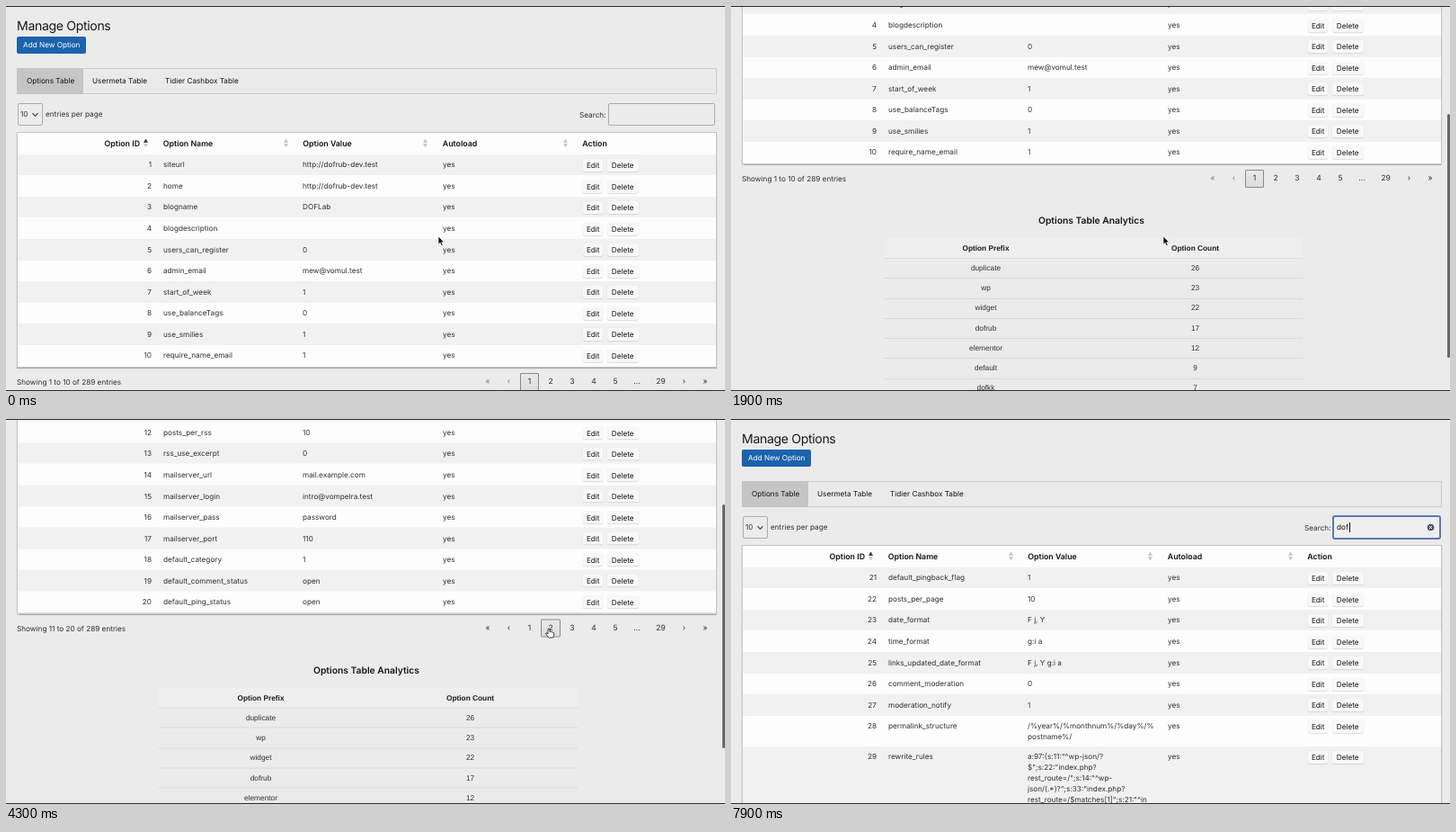
Write an HTML page that moves like this. It is 800 px wide and 428 px high and loops after 8000 ms.

```html
<!DOCTYPE html>
<html lang="en">
<head>
<meta charset="utf-8">
<title>Manage Options</title>
<style>
  html, body { margin: 0; width: 100%; height: 100%; overflow: hidden; background: #ebebeb; }
  #stage { position: relative; width: 800px; height: 428px; overflow: hidden; background: #ebebeb;
    font: 8.2px/11.8px Inter, sans-serif; color: #303030; text-rendering: geometricPrecision; }
  #stage div, #stage svg { position: absolute; box-sizing: border-box; }
  #page { left: 0; top: 0; width: 800px; height: 780px; }
  .t { white-space: pre; width: 300px; }
  .c { text-align: center; }
  .r { text-align: right; }
  .dark { color: #161616; }
  .h1 { font-size: 14.1px; letter-spacing: -.35px; color: #1a1a1a; }
  .h2 { font-size: 10.3px; font-weight: 600; color: #161616; }
  .th { font-size: 8.8px; font-weight: 600; color: #111; }
  .white { color: #fff; }
  .arial { font-family: "Liberation Sans", Arial, sans-serif; font-size: 8.3px; }
  .b { font-weight: 700; color: #1c1c1c; }
  .pg { font-size: 8.6px; }
  .i { font-style: italic; }
  .i u { color: #1c62ac; }
  .add { background: #1c63ad; border-radius: 2px; }
  .tabs { border: 1px solid #cbcbcb; background: #eaeaea; }
  .tab { background: #c5c5c5; }
  .field { border: 1px solid #acacac; border-radius: 2px; background: #ececec; }
  .focus { border-color: #5b79ae; box-shadow: 0 0 0 1px #5b79ae; background: #eee; }
  #grid { border: 1px solid #c4c4c4; background: #fdfdfd; box-shadow: 0 1px 1px #aaa; }
  .odd { background: #f1f1f1; }
  .btn { background: #f8f8f8; border-radius: 2px; box-shadow: 0 .5px 1px #c4c4c4; }
  .up, .down { border: 2.5px solid transparent; width: 5px; height: 4px; }
  .up { border-top: 0; border-bottom: 4px solid #cbcbcb; }
  .down { border-bottom: 0; border-top: 4px solid #cbcbcb; }
  .on { border-bottom-color: #444; }
  .line { background: #dadada; }
  .head { background: #eee; }
  #active { border: 1px solid #8b8b8b; border-radius: 1px; background: linear-gradient(#e9e9e9, #dcdcdc); }
  #thumb { background: #666; border-radius: 2px; }
  .edge { background: #2b2b2b; left: 0; width: 800px; }
  #caret { background: #111; }
</style>
</head>
<body>
<div id="stage">
  <div id="page"></div>
  <div id="thumb" style="left:797px;width:3px"></div>
  <div id="top" class="edge" style="top:0"></div>
  <div id="bottom" class="edge" style="bottom:0"></div>
  <svg id="cursor" width="20" height="20" viewBox="-5 -2 20 20" style="left:-5px;top:-2px">
    <path id="arrow" d="M0 0V9.2L2.1 7.3L3.6 10.6L5.2 9.9L3.8 6.7H6.6Z" fill="#111" stroke="#fff" stroke-width=".7"/>
    <path id="hand" d="M-1 .6Q0-.6 1 .6V3.6Q2 2.8 2.7 3.8Q3.8 3.2 4.3 4.3Q5.6 4 5.6 5.3V7.4Q5.2 8.7 4.7 10H-.4Q-1.3 8.2-3.4 5.9Q-3.5 4.6-2.2 5L-1 6Z" fill="#fff" stroke="#222" stroke-width=".9"/>
    <path id="beam" d="M-2-5Q0-5 0-4Q0-5 2-5M0-4V4M-2 5Q0 5 0 4Q0 5 2 5" transform="translate(0 5)" fill="none" stroke="#222" stroke-width=".9"/>
  </svg>
</div>
<script>
const LOOP = 8000;
const $ = id => document.getElementById(id);
const page = $('page');

function box(parent, x, y, w, h, cls = '') {
  const el = document.createElement('div');
  el.className = cls;
  el.style.cssText = `left:${x}px;top:${y}px;width:${w}px;height:${h}px`;
  parent.append(el);
  return el;
}

// y is the middle of the first line
function text(parent, str, x, y, cls = '') {
  const kind = cls.split(' ');
  const shift = kind.includes('r') ? 300 : kind.includes('c') ? 150 : 0;
  const el = document.createElement('div');
  el.className = 't ' + cls;
  el.style.cssText = `left:${x - shift}px;top:${y - 5.2}px`;
  el.textContent = str;
  parent.append(el);
  return el;
}

function group(parent) { return box(parent, 0, 0, 800, 0); }

// Top of the page
text(page, 'Manage Options', 12, 22.3, 'h1');
box(page, 12, 34, 77, 19, 'add');
text(page, 'Add New Option', 19, 43.5, 'white');
box(page, 12, 69, 779, 29, 'tabs');
box(page, 12, 69, 74, 29, 'tab');
text(page, 'Options Table', 23, 83.5, 'dark');
text(page, 'Usermeta Table', 96, 83.5, 'dark');
text(page, 'Tidier Cashbox Table', 177, 83.5, 'dark');

box(page, 13, 108, 28, 25, 'field');
text(page, '10', 16, 120.5);
page.insertAdjacentHTML('beforeend',
  '<svg style="left:28px;top:117px" width="9" height="8"><path d="M1.5 2.2L4.5 5.4L7.5 2.2" fill="none" stroke="#444" stroke-width="1.2"/></svg>');
text(page, 'entries per page', 44, 120.5);
text(page, 'Search:', 638, 121.5);
const field = box(page, 670, 108, 119, 25, 'field');
const query = text(page, '', 674, 120.5, 'dark');
const caret = box(page, 674, 115, 1, 11);
caret.id = 'caret';
const clear = group(page);
clear.innerHTML = '<svg style="left:774px;top:116px" width="9" height="9"><circle cx="4.5" cy="4.5" r="3.8" fill="#555"/><path d="M3 3L6 6M6 3L3 6" stroke="#fff"/></svg>';

// Options table
const grid = box(page, 12, 139.5, 779, 262);
grid.id = 'grid';
const pages = [
  `siteurl|http://dofrub-dev.test
home|http://dofrub-dev.test
blogname|DOFLab
blogdescription|
users_can_register|0
admin_email|mew@vomul.test
start_of_week|1
use_balanceTags|0
use_smilies|1
require_name_email|1`,
  `comments_notify|1
posts_per_rss|10
rss_use_excerpt|0
mailserver_url|mail.example.com
mailserver_login|intro@vompelra.test
mailserver_pass|password
mailserver_port|110
default_category|1
default_comment_status|open
default_ping_status|open`,
  `default_pingback_flag|1
posts_per_page|10
date_format|F j, Y
time_format|g:i a
links_updated_date_format|F j, Y g:i a
comment_moderation|0
moderation_notify|1
permalink_structure|/%year%/%monthnum%/%day%/%~postname%/
rewrite_rules|a:97:{s:11:"^wp-json/?~$";s:22:"index.php?~rest_route=/";s:14:"^wp-~json/(.*)?";s:33:"index.php?~rest_route=/$matches[1]";s:21:"^in
hack_file|0`
];
const ROW = 23.55, TALL = { 2: 34.2, 5: 74 };

const bodies = pages.map((rows, p) => {
  const body = group(page);
  let y = 164.8;
  rows.split('\n').forEach((row, i) => {
    const [name, raw] = row.split('|');
    const lines = raw.split('~');
    const h = TALL[lines.length] || ROW, mid = y + 11.75;
    if (i % 2 === 0) box(body, 13, y, 777, h, 'odd');
    text(body, p * 10 + i + 1, 162, mid, 'r');
    text(body, name, 175, mid);
    text(body, lines.join('\n'), 330, mid);
    text(body, 'yes', 486, mid);
    box(body, 642, mid - 6.5, 22, 14, 'btn');
    text(body, 'Edit', 653.2, mid + .6, 'c dark');
    box(body, 669, mid - 6.5, 34.5, 14, 'btn');
    text(body, 'Delete', 686.2, mid + .6, 'c dark');
    y += h;
  });
  body.extra = y - 164.8 - 10 * ROW;
  return body;
});

text(page, 'Option ID', 149, 152.7, 'th r');
['Option Name', 'Option Value', 'Autoload', 'Action'].forEach((s, i) =>
  text(page, s, 174.8 + i * 155.5, 152.7, 'th'));
for (let i = 0; i < 4; i++) {
  const x = 153 + i * 155.6;
  box(page, x, 148, 5, 4, 'up' + (i ? '' : ' on'));
  box(page, x, 153.2, 5, 4, 'down');
}

// Everything below the table
const foot = group(page);
const info = text(foot, '', 12, 418);
const active = box(foot, 572, 408, 21.5, 20);
active.id = 'active';
const spots = [536, 559.5, 582.5, 606, 630, 654, 678, 702, 728.5, 754.5, 778];
const links = ['«', '‹', 1, 2, 3, 4, 5, '…', 29, '›', '»'].map((s, i) =>
  text(foot, s, spots[i], 418, 'c pg'));

text(foot, 'Options Table Analytics', 401, 465, 'h2 c');
box(foot, 170, 484, 466, 22, 'head');
[['Option Prefix', 'Option Count'], ['duplicate', 26], ['wp', 23], ['widget', 22],
 ['dofrub', 17], ['elementor', 12], ['default', 9], ['dofkk', 7]].forEach((row, i) => {
  const y = 494.7 + i * 22.25;
  row.forEach((s, k) => text(foot, s, 283.5 + k * 233, y, 'c arial' + (i ? '' : ' b')));
  box(foot, 170, y + 11.3, 466, 1, 'line');
});
text(foot, '', 11, 697.5, 'i').innerHTML = 'Thank you for creating with <u>WordPress</u>.';
text(foot, 'Version 6.7.2', 789.5, 697.5, 'r');

// Smooth curve through [time, value] points, flat at turning points
function track(pts) {
  const slope = i => {
    const a = pts[i - 1], b = pts[i], c = pts[i + 1];
    if (!a || !c || (b[1] - a[1]) * (c[1] - b[1]) <= 0) return 0;
    return (c[1] - a[1]) / (c[0] - a[0]);
  };
  return t => {
    if (t <= pts[0][0]) return pts[0][1];
    const i = pts.findIndex(p => p[0] > t) - 1;
    if (i < 0) return pts[pts.length - 1][1];
    const [t0, v0] = pts[i], [t1, v1] = pts[i + 1], d = t1 - t0, u = (t - t0) / d;
    const ease = u * u * (3 - 2 * u);
    return v0 + (v1 - v0) * ease + d * u * (1 - u) * ((1 - u) * slope(i) - u * slope(i + 1));
  };
}

const SCROLL_END = 282.5;
const scrollAt = track([[300, 0], [1400, 110], [2300, 284.4], [2550, 284.4], [2800, SCROLL_END],
  [3600, 185.5], [5300, 185.5], [5900, 73.5], [6200, -1.3], [6350, -1.3], [6600, 0]]);
const xAt = track([[2900, 481], [3800, 604], [4450, 604], [4800, 629], [5400, 629],
  [5900, 624], [6300, 669], [6800, 725]]);
const yAt = track([[2900, 256], [3800, 233], [4450, 233], [5400, 233], [5900, 237],
  [6300, 164], [6800, 116]]);
const thumbAlpha = track([[300, 0], [450, 1], [6700, 1], [7000, 0]]);
const show = (el, on) => { el.style.display = on ? '' : 'none'; };

function render(t) {
  const s = scrollAt(t), p = t < 4000 ? 0 : t < 5000 ? 1 : 2;
  const extra = bodies[p].extra;
  page.style.transform = `translateY(${-s}px)`;
  foot.style.transform = `translateY(${extra}px)`;
  grid.style.height = 262 + extra + 'px';
  bodies.forEach((b, i) => show(b, i === p));
  info.textContent = `Showing ${p * 10 + 1} to ${p * 10 + 10} of 289 entries`;
  active.style.left = spots[p + 2] - 11 + 'px';
  links[0].style.color = links[1].style.color = p ? '' : '#777';

  const thumb = $('thumb').style;
  thumb.top = -18 + s * (p === 2 ? .558 : .61) + 'px';
  thumb.height = (p === 2 ? 251 : 271) + 'px';
  thumb.opacity = thumbAlpha(t);

  // Rubber-band overshoot moves the dark edges too
  const over = Math.min(0, s) + Math.max(0, s - SCROLL_END);
  $('top').style.height = Math.max(0, 1 - over) + 'px';
  $('bottom').style.height = Math.max(0, 1 + over) + 'px';

  const focused = t >= 6950, typed = [7300, 7500, 7800].filter(k => t >= k).length;
  field.className = focused ? 'field focus' : 'field';
  query.textContent = 'dof'.slice(0, typed);
  caret.style.left = 674 + [0, 5, 10, 13.8][typed] + 'px';
  show(caret, focused);
  show(clear, typed);

  const hand = t > 3650 && t < 6000, beam = t > 6650;
  show($('hand'), hand);
  show($('beam'), beam);
  show($('arrow'), !hand && !beam);
  show($('cursor'), !typed);
  $('cursor').style.transform = `translate(${xAt(t)}px, ${yAt(t)}px)`;
}

function tick() {
  render(performance.now() % LOOP);
  requestAnimationFrame(tick);
}
tick();
</script>
</body>
</html>
```
